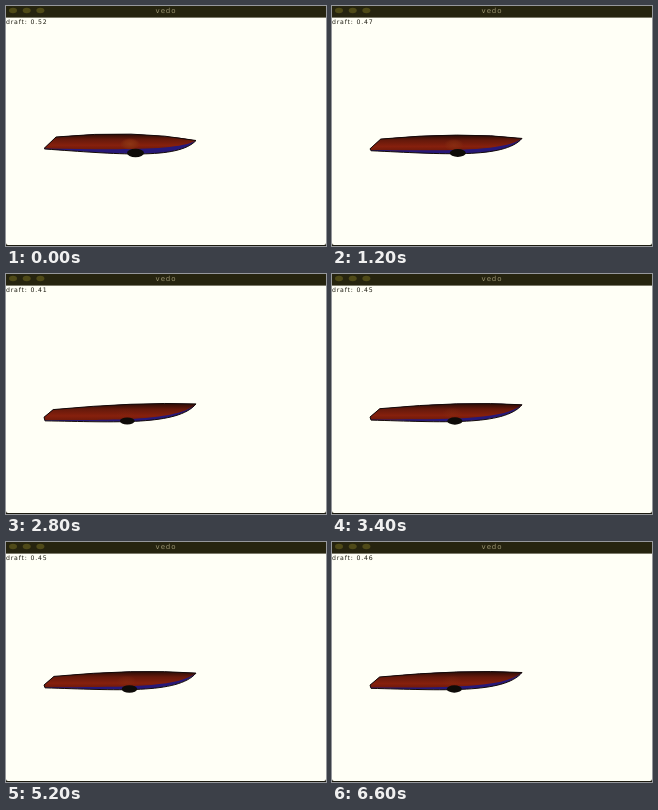
Animation of 320x240 px, one loop 6.7 s. Source, as an HTML page:

```html
<!DOCTYPE html>
<html lang="en">
<head>
<meta charset="utf-8">
<title>Floating hull</title>
<style>
  html, body { margin: 0; width: 100%; height: 100%; overflow: hidden; background: #fffff6; }
  svg { display: block; width: 100vw; height: 100vh; }
  text { font-family: "DejaVu Sans", Verdana, sans-serif; }
  #title { font-size: 7px; letter-spacing: .9px; }
  #label { font-size: 6.2px; letter-spacing: .8px; }
</style>
</head>
<body>
<svg viewBox="0 0 320 240">
  <defs>
    <linearGradient id="paint" x1="0" y1="0" x2="0" y2="1">
      <stop offset="0" stop-color="#280c06"/>
      <stop offset=".35" stop-color="#66190b"/>
      <stop offset=".75" stop-color="#86200d"/>
      <stop offset="1" stop-color="#701a0b"/>
    </linearGradient>
    <radialGradient id="glow">
      <stop offset="0" stop-color="#8f3815"/>
      <stop offset=".6" stop-color="#842c10"/>
      <stop offset="1" stop-color="#842c10" stop-opacity="0"/>
    </radialGradient>
  </defs>
  <rect width="320" height="240" fill="#1c1b10"/>
  <rect y="6" width="320" height="233" rx="2" fill="#fffff6"/>
  <rect width="320" height="11.6" fill="#26240f"/>
  <g id="buttons" fill="#4f4a18"></g>
  <text id="title" x="160" y="6.8" text-anchor="middle" fill="#9a9470">vedo</text>
  <text id="label" x="0" y="18" fill="#1c1b10"></text>
  <path id="keel" fill="#271878"/>
  <path id="side" fill="url(#paint)"/>
  <ellipse id="spot" rx="10" ry="6" fill="url(#glow)"/>
  <path id="rim" fill="none" stroke="#140a07" stroke-linejoin="round"/>
  <ellipse id="ball" fill="#0e0b08"/>
</svg>
<script>
const LOOP = 6700, STEP = 100;

// Turning points of the bobbing; pitch runs from 0 (bow up) to 1 (bow down)
const turns = [
  { at: 400, draft: .52, pitch: 1 },
  { at: 2200, draft: .388, pitch: 0 },
  { at: 4200, draft: .483, pitch: .4 },
  { at: 5900, draft: .439, pitch: .28 },
  { at: 6700, draft: .462, pitch: .2 }
];

const get = id => document.getElementById(id);
const lerp = (a, b, s) => a + (b - a) * s;

function set(node, values) {
  for (const name in values) node.setAttribute(name, values[name]);
}

// Swing from one turning point to the next on half a cosine wave
function swing(t) {
  const i = Math.max(1, turns.findIndex(turn => t < turn.at));
  const a = turns[i - 1], b = turns[i];
  const s = Math.max(0, (t - a.at) / (b.at - a.at));
  const ease = (1 - Math.cos(Math.PI * s)) / 2;
  return { draft: lerp(a.draft, b.draft, ease), pitch: lerp(a.pitch, b.pitch, ease) };
}

function drawBoat(pitch) {
  const mix = (up, down) => lerp(up, down, pitch);
  const bow = [190, mix(129.5, 134.5)];
  const rail = [mix(47, 50), mix(136, 131)];
  const crown = [130, mix(128.2, 123.5)];
  const chine = [38, mix(143.3, 142.5)];

  // The lower edge runs from the foot of the stern past two pulls to the bow.
  const hull = (foot, mid, fore) =>
    `M${chine} L${rail} Q${crown} ${bow} C172,${fore} 110,${mid} 39,${foot} Z`;

  const body = hull(mix(147.2, 143), 148, mix(151.5, 154));
  set(get("keel"), { d: body });
  set(get("rim"), { d: body });
  set(get("side"), { d: hull(mix(146.4, 142.5), mix(146, 143.5), mix(147, 145)) });
  set(get("ball"), { cx: mix(120.5, 129.5), cy: 147, rx: mix(7.3, 8.5), ry: mix(3.5, 4.2) });
  set(get("spot"), { cx: mix(119, 124), cy: mix(140, 138), opacity: pitch * .9 });
}

function draw(now) {
  const t = Math.floor((now % LOOP) / STEP) * STEP;
  const { draft, pitch } = swing(t);
  get("label").textContent = "draft: " + draft.toFixed(2);
  drawBoat(pitch);
}

for (let i = 0; i < 3; i++) {
  const dot = document.createElementNS("http://www.w3.org/2000/svg", "ellipse");
  set(dot, { cx: 7 + 13.7 * i, cy: 4.5, rx: 4, ry: 2.8 });
  get("buttons").append(dot);
}

const start = performance.now();
function tick() {
  draw(performance.now() - start);
  requestAnimationFrame(tick);
}
tick();
</script>
</body>
</html>
```
